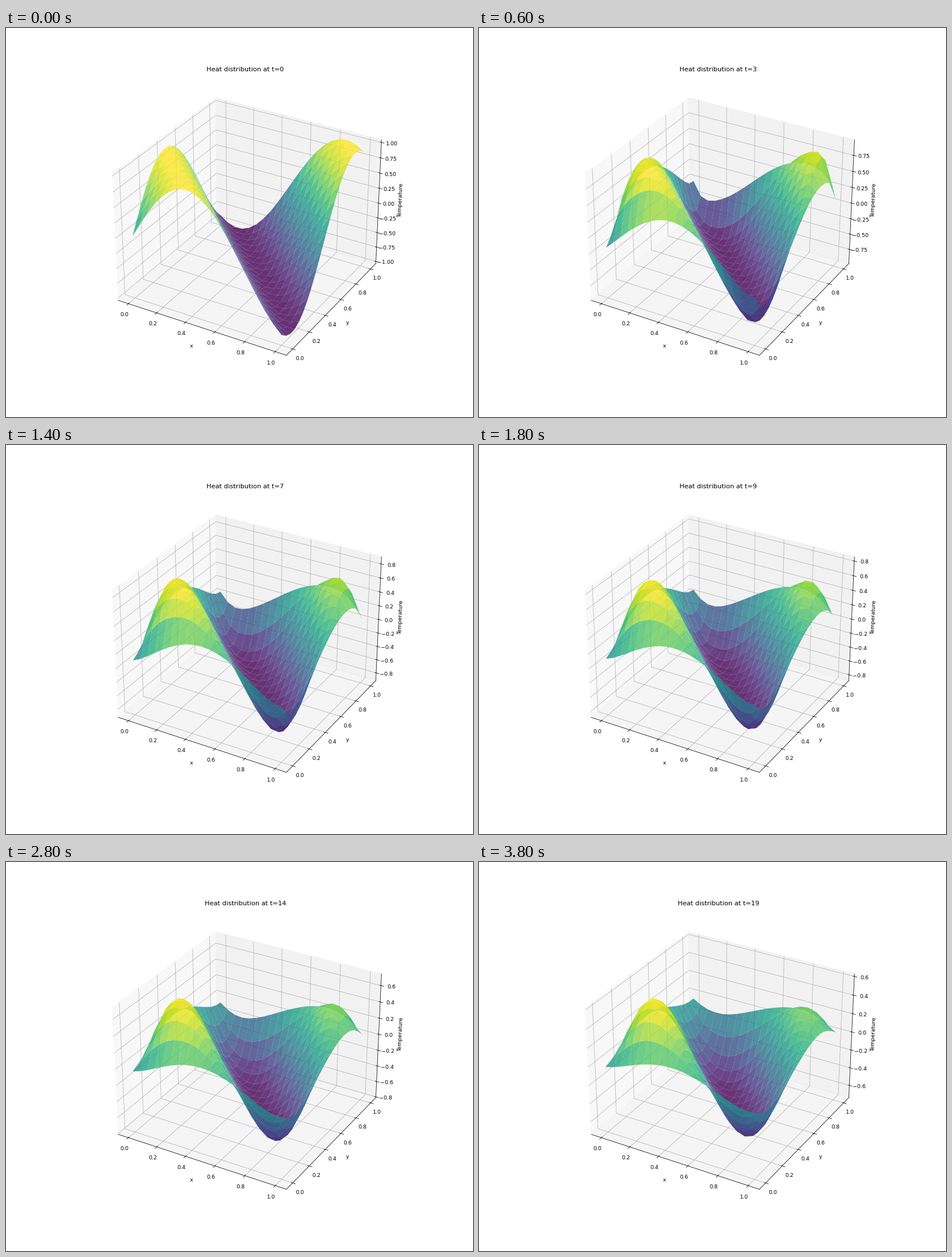
Write a matplotlib script that moves like this. It is 820x683 px and loops after 4 s.

```python
import matplotlib.pyplot as plt
import numpy as np
from matplotlib.animation import FuncAnimation

WIDTH, HEIGHT = 820, 683
DPI = 205 / 3
EPS = 1e-6          # guards against pixel sizes rounding down

N = 20              # grid points per side
STEPS = 20
DIFFUSION = 0.0005  # diffusivity times time step
WAVE = 4 * np.pi / 3
PAD = 1 / 48        # 3D view margin

axis = np.linspace(0, 1, N)
X, Y = np.meshgrid(axis, axis)
RATE = DIFFUSION / (axis[1] - axis[0]) ** 2


def diffuse(u):
    """One explicit heat step with periodic edges."""
    around = sum(np.roll(u, s, axis=a) for s in (1, -1) for a in (0, 1))
    return u + RATE * (around - 4 * u)


def padded(lo, hi, share):
    d = (hi - lo) * share
    return lo - d, hi + d


fields = [np.sin(WAVE * (X + Y))]
for _ in range(STEPS - 1):
    fields.append(diffuse(fields[-1]))

SIDE = padded(*padded(0, 1, 0.05), PAD)

fig = plt.figure(figsize=((WIDTH + EPS) / DPI, (HEIGHT + EPS) / DPI), dpi=DPI)
ax = fig.add_subplot(projection="3d")


def update(t):
    u = fields[t]
    ax.clear()
    ax.plot_surface(X, Y, u, cmap="viridis", alpha=0.8)
    ax.set_xlim(*SIDE)
    ax.set_ylim(*SIDE)
    ax.set_zlim(*padded(u.min(), u.max(), PAD))
    ax.set_xlabel("x")
    ax.set_ylabel("y")
    ax.set_zlabel("Temperature")
    ax.set_title(f"Heat distribution at t={t}")
    return []


anim = FuncAnimation(fig, update, frames=STEPS, interval=200, repeat=True, repeat_delay=0)

plt.show()
```
